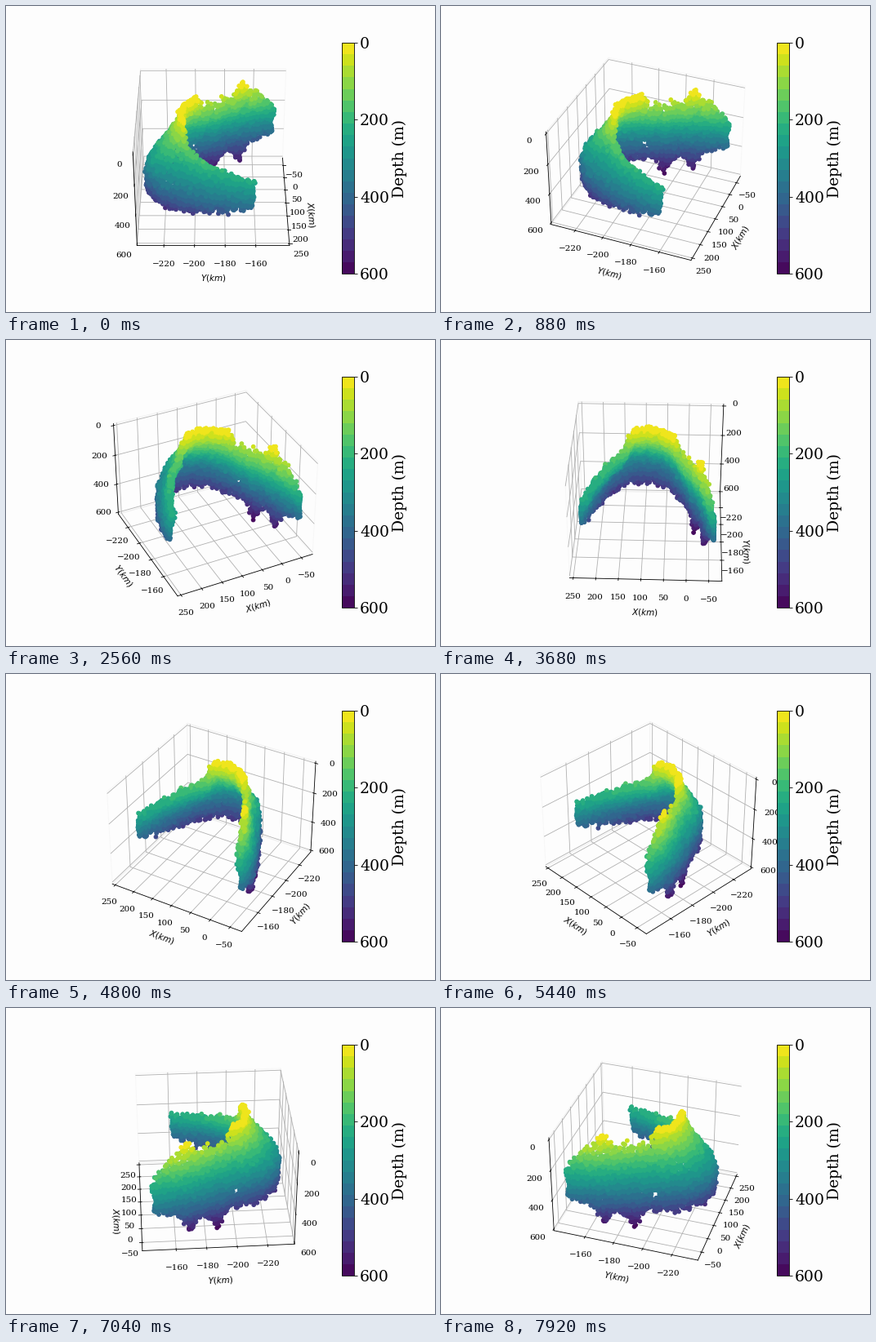
A matplotlib script for the animation above (8000 ms loop, 525x375 px).

```python
import numpy as np
import matplotlib.pyplot as plt
from matplotlib.animation import FuncAnimation
from matplotlib.cm import ScalarMappable
from matplotlib.colors import ListedColormap, Normalize

W, H, DPI = 525, 375, 75
FRAMES, INTERVAL = 100, 80
AZIM_STEP = 2
BANDS = 20

plt.rcParams.update({"font.family": "serif", "font.size": 10})


def bump(x, centre, width):
    return np.exp(-((x - centre) / width) ** 2)


def rim(u):
    """Plan view of the upper edge: a bent arc, steeper on one side."""
    v = -.24 + np.where(u > 0, 4.5 * np.abs(u) ** 3, 3 * u ** 2)
    slope = np.where(u > 0, 13.5 * u ** 2, 6 * u)
    length = np.hypot(slope, 1)
    return v, slope / length, -1 / length


def outward_reach(u):
    """How far the slab leans out at depth, most of all at the bend."""
    return (.08 + .20 * bump(u, .06, .2)) * (1 - (u / .56) ** 4)


def top_depth(u):
    """Two shallow crests with lower shoulders."""
    return np.interp(u, [-.5, -.45, -.4, -.37, -.24, -.19, .13, .2, .5],
                     [215, 100, 10, 95, 110, 15, 20, 155, 240])


def bottom_depth(u):
    """Nearly level, rising to the ends, with two deep prongs."""
    prongs = 100 * bump(u, -.31, .02) + 120 * bump(u, -.40, .02)
    return 485 - 110 * (2 * np.abs(u)) ** 4 + prongs


def slab_points(columns=230, spacing=16):
    rng = np.random.default_rng(7)
    u = np.linspace(-.5, .5, 500)
    v, nu, nv = rim(u)
    reach = outward_reach(u) / 2
    steps = np.hypot(np.diff(u + reach * nu), np.diff(v + reach * nv))
    arc = np.append(0, np.cumsum(steps))
    points = []
    for u in np.interp(np.linspace(0, arc[-1], columns), arc, u):
        far_arm = u < -.21
        v, nu, nv = rim(u)
        top = max(top_depth(u) + rng.normal(0, 22 if far_arm else 9), 3)
        bottom = min(bottom_depth(u) + rng.normal(0, 16), 600)
        p = np.linspace(0, 1, int((bottom - top) / spacing) + 1)
        lean = np.minimum(p / .75, 1)
        lean = outward_reach(u) * lean ** 2 * (3 - 2 * lean)
        jitter = rng.normal(0, .010, (2, p.size))
        depth = top + p * (bottom - top) + rng.normal(0, 3, p.size)
        sparse = far_arm & (depth < 140)
        keep = ~sparse | (rng.random(p.size) < .5)
        # small gap in the sheet
        keep &= np.hypot((u + .23) / .015, (depth - 390) / 40) > 1
        column = np.column_stack((u + lean * nu + jitter[0],
                                  v + lean * nv + jitter[1], depth))
        points.append(column[keep])
    u, v, depth = np.vstack(points).T
    u = np.clip(u, -.52, .52)
    return 88.5 + 283.1 * u, -188.5 + 83.2 * v, np.clip(depth, 2, 600)


fig = plt.figure(figsize=(W / DPI, H / DPI), dpi=DPI, facecolor="#fdfdfd")
ax = fig.add_axes([108.3 / W, .125, 283.1 / W, .755], projection="3d")
ax.patch.set_visible(False)

# each band takes the colour of its middle
band_middles = (np.arange(BANDS) + .5) / BANDS
cmap = ListedColormap(plt.colormaps["viridis_r"](band_middles))
norm = Normalize(0, 600)
x, y, depth = slab_points()
ax.scatter(x, y, depth, c=depth, cmap=cmap, norm=norm, s=20, depthshade=False)

ax.set_xticks(range(-50, 251, 50))
ax.set_yticks(range(-220, -159, 20))
ax.set_zticks(range(0, 601, 200))
ax.set_xlim(-79, 258)
ax.set_ylim(-237.5, -138)
ax.set_zlim(612.5, -12.5)
ax.set_xlabel("$X(km)$")
ax.set_ylabel("$Y(km)$")
for axis in (ax.xaxis, ax.yaxis, ax.zaxis):
    axis.pane.fill = False

cax = fig.add_axes([.78375, .125, .755 * H / 20 / W, .755])
bar = fig.colorbar(ScalarMappable(norm, cmap), cax=cax, ticks=range(0, 601, 200))
cax.invert_yaxis()
cax.tick_params(labelsize=18)
bar.set_label("Depth (m)", size=18)


def update(frame):
    # the tiny offset keeps the axes on a fixed side when seen head-on
    ax.view_init(elev=35, azim=AZIM_STEP * frame + .001)
    return ()


anim = FuncAnimation(fig, update, frames=FRAMES, interval=INTERVAL,
                     init_func=lambda: (), repeat=True, repeat_delay=0)
plt.show()
```
